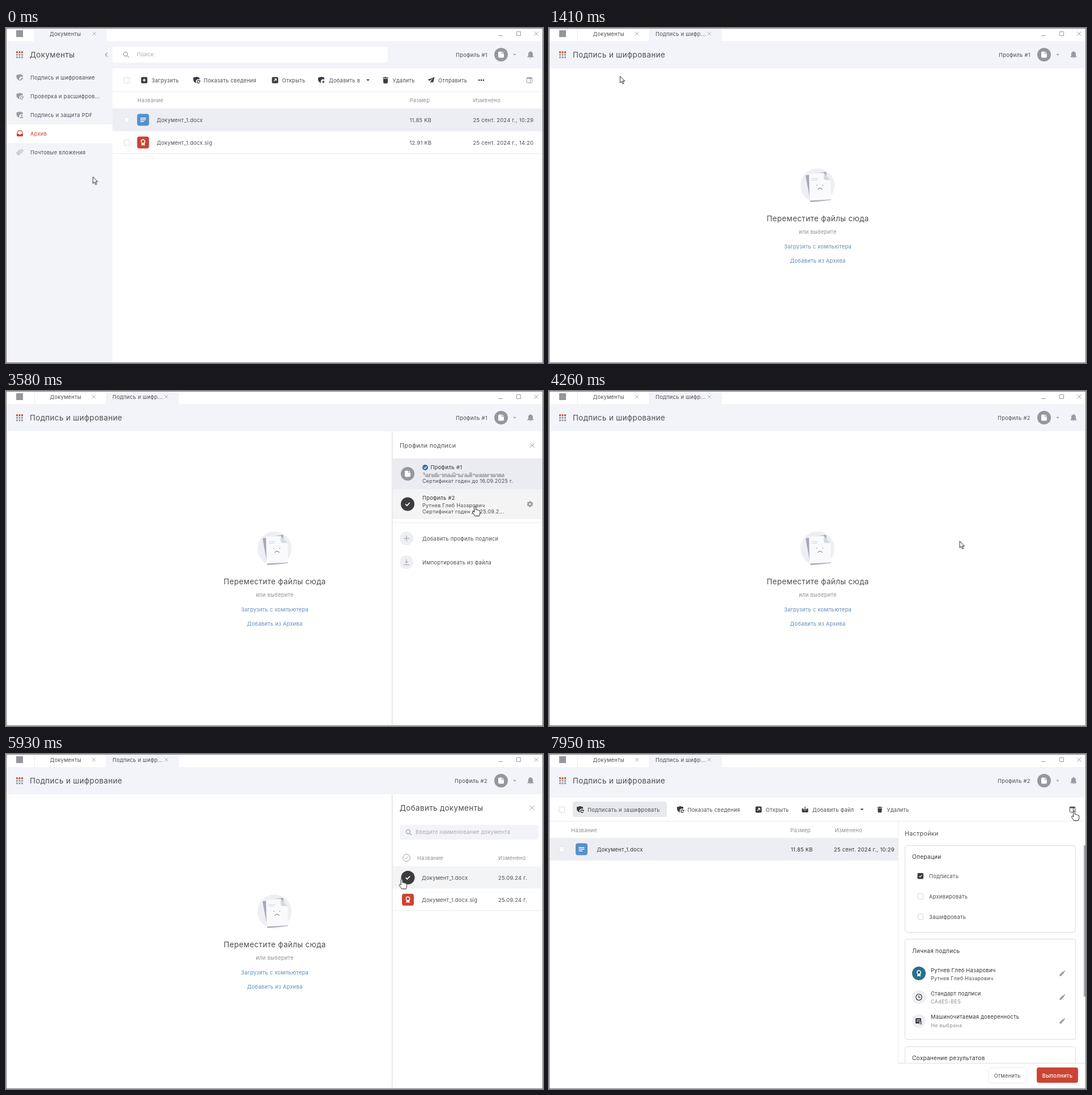
These frames come from a looping animation (948x591 px, 8 s). An HTML page:

```html
<!DOCTYPE html>
<html lang="ru">
<head>
<meta charset="utf-8">
<title>Документы</title>
<style>
html,body{margin:0;width:100%;height:100%;overflow:hidden;background:#fff}
svg{display:block}
text{font-family:Inter,sans-serif;font-size:9.33px;letter-spacing:.03em;fill:#4d4d50;white-space:pre}
.h{font-size:13.33px;letter-spacing:.031em}
.m{font-size:10.67px;letter-spacing:.033em}
.n{font-size:10px}
.s{font-size:9px}
.g{fill:#8e8f94}
.l{fill:#a9aab0}
.k{fill:#333}
.blue{fill:#5a8dbd}
.mid{text-anchor:middle}
.line{fill:none;stroke:#ebecf0}
.box{fill:#fff;stroke:#d6d7dc}
.card{fill:#fff;stroke:#d9dade}
.gray{color:#9a9ba2}
.dark{color:#3c3c3f}
.red{color:#cb4433}
.stroke{fill:none;stroke:currentColor}
.fill{fill:currentColor}
.bg{fill:#f3f4f9}

.a{animation:8s step-end infinite}
@keyframes archive{0%{visibility:visible}12.5%,100%{visibility:hidden}}
@keyframes sign{0%{visibility:hidden}12.5%,100%{visibility:visible}}
@keyframes empty{0%{visibility:hidden}12.5%{visibility:visible}81.625%,100%{visibility:hidden}}
@keyframes list{0%{visibility:hidden}81.625%,100%{visibility:visible}}
@keyframes one{0%{visibility:visible}45.625%,100%{visibility:hidden}}
@keyframes two{0%{visibility:hidden}45.625%,100%{visibility:visible}}
@keyframes over1{0%{visibility:hidden}37.5%{visibility:visible}39.3%,100%{visibility:hidden}}
@keyframes over2{0%{visibility:hidden}39.3%{visibility:visible}45.625%,100%{visibility:hidden}}
@keyframes rest2{0%{visibility:inherit}39.3%{visibility:hidden}45.625%,100%{visibility:inherit}}
@keyframes over3{0%{visibility:hidden}70.875%{visibility:visible}99.375%,100%{visibility:hidden}}
@keyframes picked{0%{fill:#f3f4f6}77.5%,100%{fill:#e4e7ec}}
@keyframes menu1{0%{color:#9a9ba2;fill:#4d4d50}7.2%,100%{color:#cb4433;fill:#cb4433}}
@keyframes menu2{0%{color:#9a9ba2;fill:#4d4d50}6.5%{color:#cb4433;fill:#cb4433}7.2%,100%{color:#9a9ba2;fill:#4d4d50}}
@keyframes menu3{0%{color:#9a9ba2;fill:#4d4d50}6.1%{color:#cb4433;fill:#cb4433}6.5%,100%{color:#9a9ba2;fill:#4d4d50}}
@keyframes arrow{0%{visibility:visible}7.2%{visibility:hidden}12.5%{visibility:visible}28.2%{visibility:hidden}45.625%{visibility:visible}58.5%{visibility:hidden}64.875%{visibility:visible}72%{visibility:hidden}87%{visibility:visible}95%,100%{visibility:hidden}}
@keyframes hand{0%{visibility:hidden}7.2%{visibility:visible}12.5%{visibility:hidden}28.2%{visibility:visible}45.625%{visibility:hidden}58.5%{visibility:visible}64.875%{visibility:hidden}72%{visibility:visible}87%{visibility:hidden}95%,100%{visibility:visible}}
@keyframes panes{0%{color:#9a9ba2}99.375%,100%{color:#3c3c3f}}
@keyframes fade{0%,12.4%{opacity:0}12.5%{opacity:.3}15%,100%{opacity:1}}
@keyframes slide1{
 0%,30.2%{transform:translateX(270px);visibility:hidden;animation-timing-function:ease-out}
 33.2%,45.62%{transform:none;visibility:visible}
 45.625%,100%{transform:none;visibility:hidden}}
@keyframes slide2{
 0%,64.6%{transform:translateX(270px);visibility:hidden;animation-timing-function:ease-out}
 67.6%,99.37%{transform:none;visibility:visible}
 99.375%,100%{transform:none;visibility:hidden}}
@keyframes move{
 0%,3.4%{transform:translate(153.5px,262.5px)}
 4.9%{transform:translate(162px,235px)}
 5.9%{transform:translate(168px,181px)}
 6.8%{transform:translate(153px,128px)}
 7.6%{transform:translate(131px,94px)}
 8.375%,20.2%{transform:translate(125.5px,85px)}
 21.5%{transform:translate(128px,89px);animation-timing-function:ease-in}
 24.5%{transform:translate(390px,85px)}
 26.8%{transform:translate(649px,74px);animation-timing-function:ease-out}
 28.75%,35%{transform:translate(829.5px,58px);animation-timing-function:ease-in}
 37.2%{transform:translate(840px,108px)}
 39.2%{transform:translate(834px,172px);animation-timing-function:ease-out}
 40.625%{transform:translate(828px,202px)}
 41.375%,49.8%{transform:translate(828px,203px);animation-timing-function:ease-in}
 53%{transform:translate(735px,260px)}
 56%{transform:translate(622px,316px);animation-timing-function:ease-out}
 59.125%,65%{transform:translate(518px,407px);animation-timing-function:ease-in-out}
 70%{transform:translate(672px,238px)}
 71.625%{transform:translate(684px,232px)}
 73.375%{transform:translate(692px,226px)}
 75%,77.4%{transform:translate(706px,214px)}
 78.3%,85%{transform:translate(708px,214px);animation-timing-function:ease-in}
 87.5%{transform:translate(738px,222px)}
 92%{transform:translate(868px,142px);animation-timing-function:ease-out}
 95.25%{transform:translate(932px,92px)}
 96.125%,100%{transform:translate(927px,100px)}}
</style>
</head>
<body>
<svg width="948" height="591" viewBox="0 0 948 591">
<defs>
 <path id="shield" d="M-6-4.6 0-6 5-4.6V-1A4 4 0 0 0 0 5.2C-4 4-6 2-6-1Z"/>
 <g id="sh-edit"><use href="#shield" class="fill"/><path class="fill" d="M0 5.5.5 3.5 4.3-.4 6 1.2 2.1 5.1Z"/></g>
 <g id="sh-turn"><use href="#shield" class="fill"/><path class="stroke" stroke-width="1.3" d="M5.6 1.8A2.4 2.4 0 1 0 5.4 4.2M6 .4V2.2H4.2"/></g>
 <g id="sh-user"><use href="#shield" class="fill"/><path class="fill" d="M1.7.9a1.5 1.5 0 1 1 3 0a1.5 1.5 0 1 1-3 0M.5 5.6C.5 2.5 6 2.5 6 5.6Z"/></g>
 <g id="sh-plus"><use href="#shield" class="fill"/><path class="stroke" stroke-width="1.3" d="M3.2.4V5.4M.7 2.9H5.7"/></g>
 <path id="tray" class="stroke" stroke-width="1.1" d="M-5 .5-3.6-3.8Q-3.3-4.6-2.5-4.6H2.5Q3.3-4.6 3.6-3.8L5 .5V3.6Q5 4.6 4 4.6H-4Q-5 4.6-5 3.6Z"/>
 <path id="clip" class="stroke" d="M2.8-2.2-1.6 2.4A1 1 0 0 1-3 1L1.8-3.9A2 2 0 0 1 4.6-1L-.8 4.3A3 3 0 0 1-4.8 0L-.5-4.4"/>
 <g id="plus-box"><rect class="fill" x="-5.5" y="-5.5" width="11" height="11" rx="2"/><path stroke="#fff" stroke-width="1.3" d="M0-2.7V2.7M-2.7 0H2.7"/></g>
 <g id="open-box"><rect class="fill" x="-5.5" y="-5.5" width="11" height="11" rx="2"/><path fill="none" stroke="#fff" stroke-width="1.2" d="M-2.2 2.2 2-2M-1.2-2.2H2.2V1.2"/></g>
 <path id="trash" class="fill" d="M-5-4.8H-2L-1.2-5.8H1.2L2-4.8H5V-3.4H-5ZM-4.2-2.6H4.2L3.7 4.8Q3.6 5.8 2.6 5.8H-2.6Q-3.6 5.8-3.7 4.8Z"/>
 <path id="plane" class="fill" d="M6-5.6-6-.8-2.6 1 3.6-3.4-1 2.1V5.6L1 3 3.6 4.4Z"/>
 <path id="down" class="fill" d="M-3-1.5H3L0 1.6Z"/>
 <g id="panes" class="stroke"><rect x="-4.7" y="-4.7" width="9.4" height="9.4" rx="1.2"/><path stroke-width="2" d="M-4.5-3.5H4.5"/><path d="M1.5-3V4.5"/></g>
 <path id="add-file" class="fill" d="M-5.5-2H-3.2V-.5H-1L-2 .8 0 3 2 .8 1-.5H3.2V-2H5.5V3.5Q5.5 5 4 5H-4Q-5.5 5-5.5 3.5ZM-.7-5H.7V.3H2L0 2.2-2 .3H-.7Z"/>
 <path id="close" class="stroke" d="M-4-4 4 4M4-4-4 4"/>
 <g id="tick"><circle r="12" fill="#3c3c3f"/><path fill="none" stroke="#fff" stroke-width="1.7" d="M-3.7.2-1.2 2.7 3.8-2.5"/></g>
 <g id="ava"><circle r="12" fill="#96979d"/><path fill="#fff" d="M-3-5.5H2L5-2.5V3.5Q5 5.5 3 5.5H-3Q-5 5.5-5 3.5V-3.5Q-5-5.5-3-5.5Z"/><path fill="none" stroke="#96979d" d="M1.4-5.5V-2H5"/></g>
 <rect id="check" class="box" x="-4.7" y="-4.7" width="9.6" height="9.6" rx="2"/>
 <g id="doc"><rect x="-10.5" y="-10.5" width="21" height="21" rx="4" fill="#5590cb"/><path stroke="#fff" stroke-width="1.3" d="M-5-3H5M-5 0H5M-5 3H1.5"/></g>
 <g id="award"><circle cy="-1.8" r="3.2" fill="none" stroke="#fff" stroke-width="1.5"/><path fill="#fff" d="M-2.8 1.5H2.8V5.7L0 4.4-2.8 5.7Z"/></g>
 <g id="sig"><rect x="-10.5" y="-10.5" width="21" height="21" rx="4" fill="#cb4433"/><use href="#award"/></g>
 <g id="lens" class="stroke" stroke-width="1.1"><circle cx="-1" cy="-1" r="3.6"/><path d="M1.8 1.8 5 5"/></g>
 <path id="pencil" class="fill" d="M-4.7 4.7V2.5L1.6-3.8 3.8-1.6-2.5 4.7ZM2.3-4.4 3.2-5Q3.6-5.2 4-4.9L4.9-4Q5.2-3.6 5-3.2L4.4-2.3Z"/>
 <g id="gear" class="stroke"><circle r="3" stroke-width="2.6"/><circle r="4.6" stroke-width="1.8" stroke-dasharray="2.6 2.217" transform="rotate(14)"/></g>
 <linearGradient id="shade"><stop offset="0" stop-opacity="0"/><stop offset="1" stop-opacity=".1"/></linearGradient>
 <clipPath id="cut"><rect x="617" y="119" width="330" height="426"/></clipPath>
 <clipPath id="side"><rect x="670" y="71" width="277" height="519"/></clipPath>
 <clipPath id="col"><rect x="480" y="120" width="130" height="80"/></clipPath>
</defs>

<!-- archive page -->
<g class="a" style="animation-name:archive">
 <path class="bg" d="M50 1H178V23H947V71H188V590H1V23H50Z"/>
 <path fill="#fff" d="M1 170H188V203H1Z"/>
 <text x="77" y="13.6">Документы</text>
 <use href="#close" class="gray" transform="translate(156 10) scale(.8)"/>
 <text class="h" x="42" y="52">Документы</text>
 <path class="stroke gray" stroke-width="1.3" d="M179 43.5 175.5 47 179 50.5"/>
 <rect x="188" y="33" width="486" height="28" rx="4" fill="#fff"/>
 <use href="#lens" class="gray" x="212" y="47"/>
 <text class="l" x="231" y="50.4">Поиск</text>
 <g class="a" style="animation-name:menu1"><use href="#sh-edit" x="24.5" y="87.5"/><text style="fill:inherit" x="43" y="91">Подпись и шифрование</text></g>
 <g class="a" style="animation-name:menu2"><use href="#sh-turn" x="24.5" y="120.5"/><text style="fill:inherit" x="43" y="124">Проверка и расшифров...</text></g>
 <g class="a" style="animation-name:menu3"><use href="#sh-user" x="24.5" y="153.5"/><text style="fill:inherit" x="43" y="157">Подпись и защита PDF</text></g>
 <g class="red"><use href="#tray" x="24.5" y="186"/><path class="fill" d="M19.5 186.5H22.5Q24.5 190 26.5 186.5H29.5V190.5H19.5Z"/></g>
 <text x="43" y="190" style="fill:#cb4433">Архив</text>
 <use href="#clip" class="gray" x="24.5" y="219"/><text x="43" y="223">Почтовые вложения</text>

 <use href="#check" x="213" y="92"/>
 <g class="dark">
  <use href="#plus-box" x="244" y="92"/><use href="#sh-turn" x="336.5" y="92"/><use href="#open-box" x="475" y="92"/>
  <use href="#sh-plus" x="557" y="92"/><use href="#down" x="639" y="92"/><use href="#trash" x="670" y="92"/><use href="#plane" x="750.5" y="92"/>
  <path class="fill" d="M834 90.8h2.4v2.4h-2.4zM837.8 90.8h2.4v2.4h-2.4zM841.6 90.8h2.4v2.4h-2.4z"/>
 </g>
 <text x="257" y="95.5">Загрузить</text><text x="349" y="95.5">Показать сведения</text><text x="487.5" y="95.5">Открыть</text>
 <text x="570" y="95.5">Добавить в</text><text x="682.5" y="95.5">Удалить</text><text x="763" y="95.5">Отправить</text>
 <use href="#panes" class="gray" x="924" y="92"/>
 <path class="line" d="M188 112.5H947M188 221.5H947"/>
 <path fill="#edeef3" d="M188 142H947V182H188Z"/>
 <text class="g" x="232" y="131">Название</text><text class="g" x="712.5" y="131">Размер</text><text class="g" x="824.5" y="131">Изменено</text>
 <use href="#check" x="213" y="162" opacity=".7"/><use href="#doc" x="242" y="162"/>
 <text x="266" y="165.5">Документ_1.docx</text><text x="712.5" y="165.5">11.85 KB</text><text x="824.5" y="165.5">25 сент. 2024 г., 10:29</text>
 <use href="#check" x="213" y="202"/><use href="#sig" x="242" y="202"/>
 <text x="266" y="205.5">Документ_1.docx.sig</text><text x="712.5" y="205.5">12.91 KB</text><text x="824.5" y="205.5">25 сент. 2024 г., 14:20</text>
</g>

<!-- signing page -->
<g class="a" style="animation-name:sign">
 <path class="bg" d="M177 1H305V23H947V71H1V23H177Z"/>
 <path class="line" d="M177.5 1V23"/>
 <text x="77.5" y="13.6">Документы</text>
 <text x="188" y="13.6">Подпись и шифр...</text>
 <g class="gray"><use href="#close" transform="translate(155 10) scale(.8)"/><use href="#close" transform="translate(283 10) scale(.8)"/></g>
 <text class="h" x="42" y="52">Подпись и шифрование</text>
</g>

<g style="animation:fade 8s linear infinite"><g class="a" style="animation-name:empty">
 <circle cx="474" cy="278" r="30" fill="#eeeff4"/>
 <path fill="#a6a9b5" d="M453 260 489 253.5 498 303.5 461.5 307Z"/>
 <path fill="#fafafc" d="M459 257 485 255.5 497 268 498 302.5 460 304.5Z"/>
 <path fill="#d3dbdf" d="M485 255.5 497 268.5 487 268Q485 267.5 485 265Z"/>
 <path stroke="#d0d3dc" d="M463.5 265.5H475M463.5 268.5H473"/>
 <path fill="none" stroke="#666b78" stroke-width="1.2" d="M474.5 285Q478.5 280 482.5 285M472 277.5h1.5M482.5 277.5h1.5"/>
 <text class="h mid" x="474.5" y="341">Переместите файлы сюда</text>
 <text class="g mid" x="474.5" y="363">или выберите</text>
 <text class="blue mid" x="474.5" y="388.5">Загрузить с компьютера</text>
 <text class="blue mid" x="474.5" y="414">Добавить из Архива</text>
</g></g>

<g class="a" style="animation-name:list">
 <path class="bg" d="M1 70H947V77H1Z"/>
 <rect x="42" y="84" width="166" height="27" rx="4" fill="#e8e9ee"/>
 <use href="#check" x="22.5" y="98"/>
 <g class="dark"><use href="#sh-turn" x="55" y="98"/><use href="#sh-turn" x="232" y="98"/><use href="#open-box" x="370" y="98"/><use href="#add-file" x="452" y="98"/><use href="#down" x="552.5" y="98"/><use href="#trash" transform="translate(584 98) scale(.9)"/></g>
 <text x="68" y="101.5">Подписать и зашифровать</text><text x="244.5" y="101.5">Показать сведения</text><text x="382.5" y="101.5">Открыть</text>
 <text x="465" y="101.5">Добавить файл</text><text x="596.5" y="101.5">Удалить</text>
 <g class="a" style="animation-name:panes"><use href="#panes" x="924" y="98"/></g>
 <path class="line" d="M1 118.5H947M616.5 119V590"/>
 <path fill="#edeef3" d="M1 148H616V188H1Z"/>
 <text class="g" x="39" y="137.5">Название</text><text class="g" x="426" y="137.5">Размер</text><text class="g" x="504.5" y="137.5">Изменено</text>
 <use href="#check" x="22.5" y="168" opacity=".7"/><use href="#doc" x="57.5" y="168"/>
 <text class="k" x="84.5" y="171.5">Документ_1.docx</text><text class="k" x="427" y="171.5">11.85 KB</text>
 <text class="k" x="503" y="171.5" clip-path="url(#col)">25 сент. 2024 г., 10:29</text>
 <g clip-path="url(#cut)">
  <text class="m" x="628" y="144">Настройки</text>
  <rect class="card" x="628.5" y="161.5" width="301" height="153" rx="4"/>
  <rect class="card" x="628.5" y="326.5" width="301" height="177" rx="4"/>
  <rect class="card" x="628.5" y="516.5" width="301" height="60" rx="4"/>
  <text class="k n" x="641" y="184.5">Операции</text>
  <rect x="650.5" y="210" width="10.5" height="10.5" rx="2" fill="#3c3c3f"/><path fill="none" stroke="#fff" stroke-width="1.2" d="M653.5 215.3 655.2 217 658.3 213.6"/>
  <use href="#check" x="656" y="251"/><use href="#check" x="656" y="287"/>
  <text x="671" y="219">Подписать</text><text x="671" y="255">Архивировать</text><text x="671" y="290.5">Зашифровать</text>
  <text class="k n" x="641" y="350.5">Личная подпись</text>
  <circle cx="653" cy="387" r="12" fill="#27708c"/><use href="#award" x="653" y="387"/>
  <g fill="#eeeff3"><circle cx="653" cy="429" r="12"/><circle cx="653" cy="471" r="12"/></g>
  <g class="dark"><path class="stroke" stroke-width="1.2" d="M653 423.7a5.3 5.3 0 1 0 .1 0M653 426V429.3L655.3 430.6"/><path class="fill" d="M647 467Q647 466 648 466H656Q657 466 657 467V471H654V475.5H648Q647 475.5 647 474.5ZM655 472.5a1.5 1.5 0 1 1 3 0a1.5 1.5 0 1 1-3 0M654 476.5Q656.5 473 659 476.5Z"/><path stroke="#fff" d="M649 469H655M649 471.5H652.5"/></g>
  <text class="k" x="674" y="385">Рутнев Глеб Назарович</text><text class="s" x="674" y="399">Рутнев Глеб Назарович</text>
  <text class="k" x="674" y="425.5">Стандарт подписи</text><text class="s g" x="674" y="440">CAdES-BES</text>
  <text class="k" x="674" y="467">Машиночитаемая доверенность</text><text class="s g" x="674" y="482">Не выбрана</text>
  <g class="gray"><use href="#pencil" x="906" y="387"/><use href="#pencil" x="906" y="429"/><use href="#pencil" x="906" y="471"/></g>
  <text class="k n" x="641" y="540">Сохранение результатов</text>
  <rect x="944" y="161" width="3" height="267" fill="#a5a7b2"/>
 </g>
 <path fill="#fff" d="M616 545H947V590H616Z"/><path d="M616 545.5H947" stroke="#dcdde1"/>
 <rect class="line" x="775.5" y="553.5" width="68" height="27" rx="4"/><text class="mid" x="809" y="570.5">Отменить</text>
 <rect x="861" y="553" width="73" height="27" rx="4" fill="#cb4433"/><text class="mid" x="897.5" y="570.5" style="fill:#fff;font-weight:500">Выполнить</text>
</g>

<!-- shared header -->
<path class="line" d="M50.5 1V23"/>
<rect x="18" y="4" width="12" height="12" fill="#95969b"/>
<g class="gray">
 <path class="stroke" d="M869 13.5H877M901.5 6.5H908.5V13.5H901.5Z"/><use href="#close" transform="translate(936 10) scale(.9)"/>
 <path fill="none" stroke="#cb4433" stroke-width="3" stroke-dasharray="3 1.5" d="M18 42.7H30"/>
 <path class="stroke" stroke-width="3" stroke-dasharray="3 1.5" d="M18 47.2H30M18 51.7H30"/>
 <use href="#down" transform="translate(898 47) scale(.9)"/>
 <path class="fill" d="M920.5 51.5V50.5L922 49V45.5Q922 42.5 925.3 41.7V41Q926 40 926.7 41V41.7Q930 42.5 930 45.5V49L931.5 50.5V51.5ZM924.5 52.2H927.5Q926 54.3 924.5 52.2Z"/>
</g>
<text class="a" style="animation-name:one" x="794" y="50.5">Профиль #1</text>
<text class="a" style="animation-name:two" x="792" y="50.5">Профиль #2</text>
<use href="#ava" x="874" y="47"/>

<!-- profiles drawer -->
<g clip-path="url(#side)"><g style="animation:slide1 8s linear infinite">
 <path fill="url(#shade)" d="M679 71H683V590H679Z"/><path fill="#fff" d="M683 71H947V590H683Z"/>
 <text class="m" x="695" y="99.5">Профили подписи</text><use href="#close" class="gray" x="929" y="96"/>
 <path fill="#ebecf2" d="M683 119H947V173H683Z"/>
 <use href="#ava" x="709" y="146"/>
 <g class="a" style="animation-name:over1"><use href="#tick" x="709" y="146"/><use href="#gear" class="gray" x="925" y="146"/></g>
 <circle cx="740" cy="135" r="5" fill="#3f719f"/><path fill="none" stroke="#fff" stroke-width="1.2" d="M737.7 135.2 739.4 136.9 742.5 133.5"/>
 <text class="k" x="749.5" y="138.3">Профиль #1</text>
 <text class="s" x="735" y="151" opacity=".75">Зарубцева Ольга Вениаминова</text>
 <path stroke="#ebecf2" stroke-width="4" d="M735 150.5H882"/>
 <path stroke="#a5a7ae" stroke-width="4" stroke-dasharray="9 2 14 5 6 1 17 4" d="M740 150H880" opacity=".8"/>
 <text class="s" x="735" y="162.3">Сертификат годен до 16.09.2025 г.</text>
 <g class="a" style="animation-name:rest2"><use href="#ava" x="709" y="199.5"/><text class="s" x="735" y="216">Сертификат годен до 25.09.2025 г.</text></g>
 <g class="a" style="animation-name:over2"><path fill="#f4f4f5" d="M683 173H947V226H683Z"/><use href="#tick" x="709" y="199.5"/><use href="#gear" class="gray" x="925" y="199.5"/><text class="s" x="735" y="216">Сертификат годен до 25.09.2...</text></g>
 <text class="k" x="735" y="192">Профиль #2</text><text class="s" x="735" y="205">Рутнев Глеб Назарович</text>
 <path class="line" d="M683 232.5H947"/>
 <g fill="#eeeff3"><circle cx="707" cy="260" r="12"/><circle cx="707" cy="302" r="12"/></g>
 <path class="stroke gray" d="M707 255V265M702 260H712M707 297V303.5M704.5 301 707 303.5 709.5 301M702 306.5H712"/>
 <text x="735" y="263.5">Добавить профиль подписи</text><text x="735" y="305.5">Импортировать из файла</text>
</g></g>

<!-- documents drawer -->
<g clip-path="url(#side)"><g style="animation:slide2 8s linear infinite">
 <path fill="url(#shade)" d="M679 71H683V590H679Z"/><path fill="#fff" d="M683 71H947V590H683Z"/>
 <text class="h" x="695" y="99.5">Добавить документы</text><use href="#close" class="gray" x="928.5" y="95"/>
 <rect class="bg" x="695" y="125" width="245" height="26" rx="4"/>
 <use href="#lens" class="gray" x="711" y="138"/><text class="l" x="723" y="141.3">Введите наименование документа</text>
 <g class="stroke gray"><circle cx="707" cy="183" r="6.3"/><path d="M704 183.3 706.2 185.3 710 181"/></g>
 <text class="g" x="726" y="186.5">Название</text><text class="g" x="869" y="186.5">Изменено</text>
 <use href="#doc" x="709.5" y="218"/>
 <g class="a" style="animation-name:over3"><path class="a" style="animation-name:picked" d="M683 198H947V237H683Z"/><use href="#tick" x="709.5" y="218"/></g>
 <text x="734" y="221.5">Документ_1.docx</text><text x="869" y="221.5">25.09.24 г.</text>
 <use href="#sig" x="709.5" y="257"/><text x="734" y="261">Документ_1.docx.sig</text><text x="869" y="261">25.09.24 г.</text>
 <path class="line" d="M683 276.5H947"/>
</g></g>

<rect x=".5" y=".5" width="947" height="590" fill="none" stroke="#77777a"/>

<g style="animation:move 8s linear infinite" fill="#fff" stroke="#222" stroke-linejoin="round">
 <path class="a" style="animation-name:arrow" d="M0 0V11.8L2.7 9.3 4.6 13.7 6.5 12.9 4.6 8.6H8.3Z"/>
 <path class="a" style="animation-name:hand" d="M-1.4 1.8Q-1.4.5 0 .5T1.4 1.8V6.3Q3.8 5.8 4.1 7 6.4 6.6 6.7 7.9 8.6 7.7 8.8 9.3V12.5Q8.7 14.8 7.4 17.5H-.2Q-2 14.5-4.2 11.8-5 10-3.7 9.4-2.5 9.2-1.4 11Z"/>
</g>
</svg>
</body>
</html>
```
